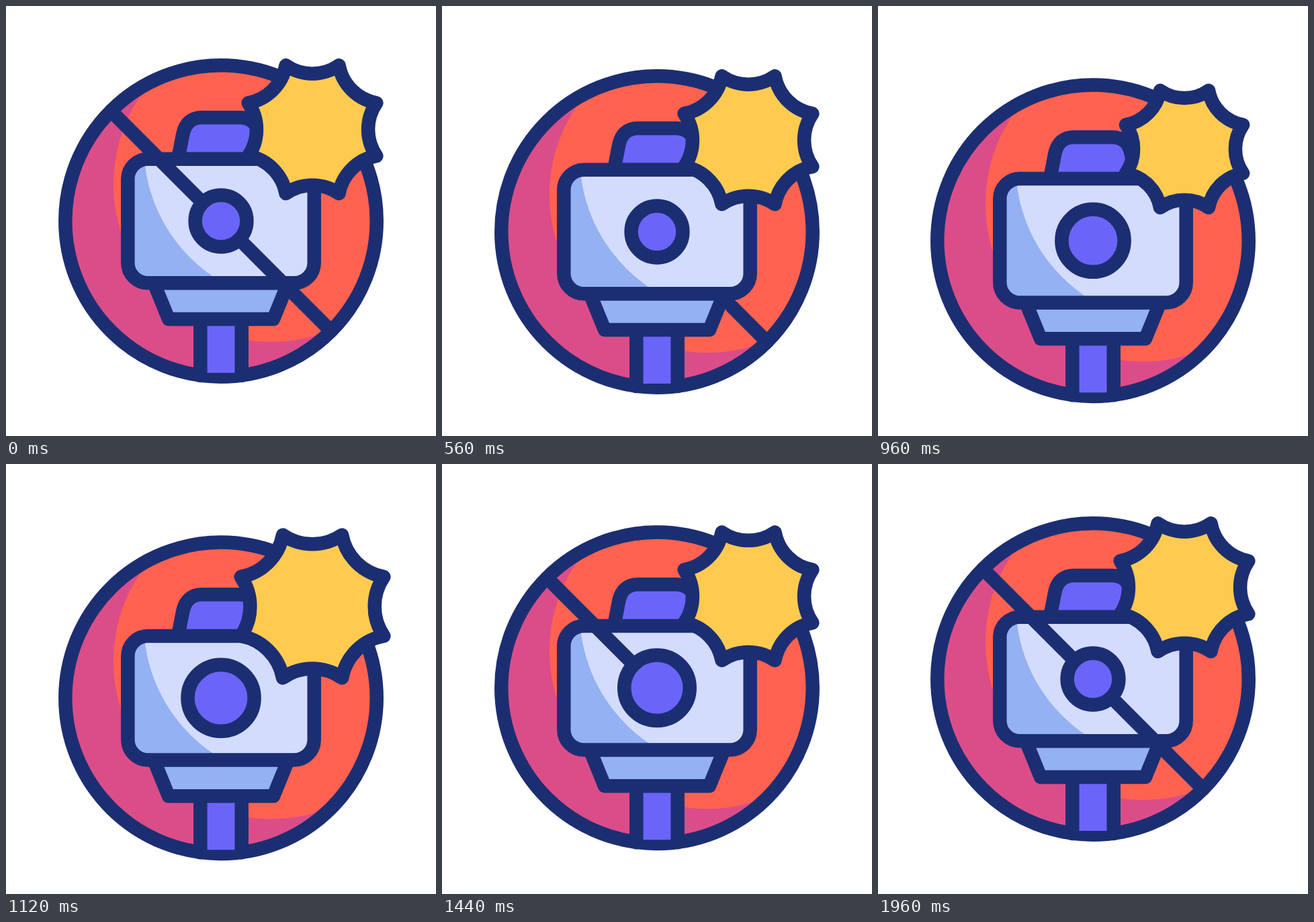
An HTML page that plays this animation: 640x640 px, repeating every 2120 ms.

```html
<!DOCTYPE html>
<html lang="en">
<head>
<meta charset="utf-8">
<title>No flash photography</title>
<style>
  html, body { margin: 0; height: 100%; overflow: hidden; background: #fff; }
  svg { display: block; width: 100vw; height: 100vh; }
  .ink { stroke: #1c2e72; stroke-width: 20.5; stroke-linecap: round; stroke-linejoin: round; }
</style>
</head>
<body>
<svg viewBox="0 0 640 640">
  <defs>
    <clipPath id="disc"><circle cx="320" cy="320" r="231.7"/></clipPath>
    <clipPath id="case"><rect x="181.3" y="227.7" width="277.4" height="184.6" rx="30"/></clipPath>
  </defs>
  <g id="sign">
    <g clip-path="url(#disc)">
      <rect width="640" height="640" fill="#db4d88"/>
      <circle cx="395" cy="265" r="235" fill="#ff6250"/>
    </g>
    <circle class="ink" cx="320" cy="320" r="231.7" fill="none"/>

    <!-- pole, tray and flash unit -->
    <path d="M290 466H350V546H290Z" fill="#6a65f8"/>
    <path class="ink" d="M289.3 466V550M350.7 466V550" fill="none"/>
    <path class="ink" d="M220 412L242 466H398L420 412Z" fill="#94b1f2"/>
    <path class="ink" d="M256 228L263 192Q268 166 292 166H348Q372 166 377 192L384 228Z" fill="#6a65f8"/>

    <!-- camera case -->
    <g clip-path="url(#case)">
      <rect x="170" y="217" width="300" height="206" fill="#94b1f2"/>
      <circle cx="440" cy="208" r="235" fill="#d3dcfd"/>
    </g>
    <rect class="ink" x="181.3" y="227.7" width="277.4" height="184.6" rx="30" fill="none"/>

    <path id="slash" class="ink" fill="none"/>
    <circle id="lens" class="ink" cx="320" cy="320" fill="#6a65f8"/>
    <path id="burst" class="ink" fill="#fecb50"/>
  </g>
</svg>
<script>
  const LOOP = 2120, STEP = 40;
  const [sign, slash, lens, burst] =
    ['sign', 'slash', 'lens', 'burst'].map(id => document.getElementById(id));

  // Cubic bezier (.5, 0, .5, 1), solved with Newton steps
  function ease(x) {
    if (x <= 0) return 0;
    if (x >= 1) return 1;
    let u = x;
    for (let i = 0; i < 6; i++) {
      u -= (1.5 * u * (1 - u) + u ** 3 - x) / (1.5 - 3 * u + 3 * u * u);
    }
    return u * u * (3 - 2 * u);
  }

  const ramp = (t, from, to) => ease((t - from) / (to - from));

  function burstPath(scale) {
    const r = 103.2 * scale, bend = 69.6 * scale;
    let d = '';
    for (let i = 0; i <= 8; i++) {
      const a = (i + 0.5) * Math.PI / 4;
      const x = 456 + r * Math.cos(a), y = 183.7 + r * Math.sin(a);
      d += (i ? `A${bend} ${bend} 0 0 0 ` : 'M') + x + ' ' + y;
    }
    return d + 'Z';
  }

  function slashPath(t) {
    const start = 156.3, length = 327.4;
    const cut = ramp(t, 140, 740), grow = ramp(t, 1160, 1760);
    const [from, to] = cut < 1 ? [cut, 1] : [0, grow];
    if (from >= to) return '';
    const a = start + from * length, b = start + to * length;
    return `M${a} ${a}L${b} ${b}`;
  }

  function draw(t) {
    const drop = 29.2 * (ramp(t, 120, 960) - ramp(t, 1000, 1840));
    const swell = 11.7 * (ramp(t, 530, 1240) - ramp(t, 1260, 1960));
    const scale = 1 - 0.21 * ramp(t, 600, 820)
      + 0.327 * ramp(t, 820, 1140) - 0.117 * ramp(t, 1140, 1400);
    sign.setAttribute('transform', `translate(0 ${drop})`);
    lens.setAttribute('r', 38.4 + swell);
    slash.setAttribute('d', slashPath(t));
    burst.setAttribute('d', burstPath(scale));
  }

  function tick() {
    const t = performance.now() % LOOP;
    draw(Math.floor(t / STEP) * STEP);
    requestAnimationFrame(tick);
  }
  tick();
</script>
</body>
</html>
```
